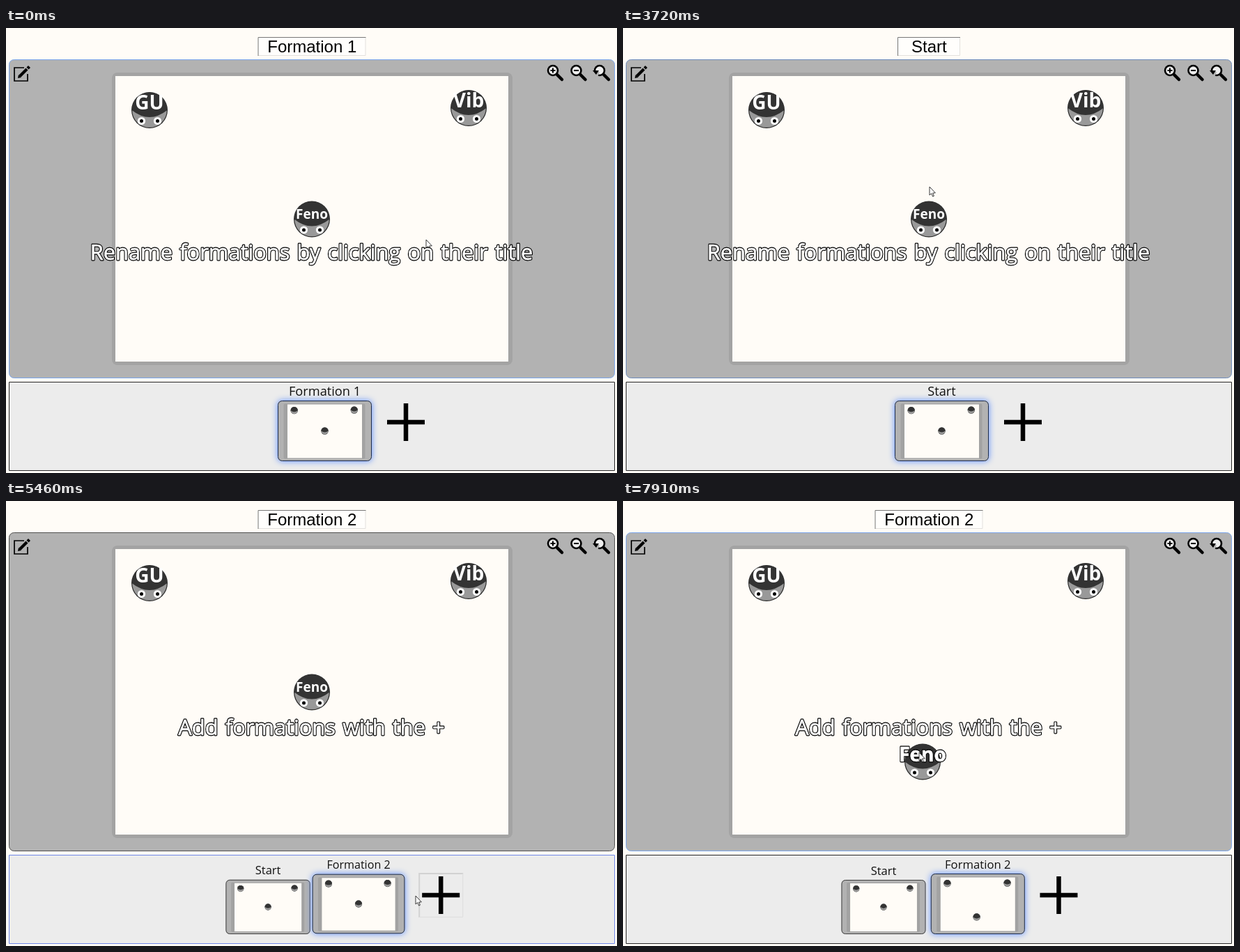
Animation of 877 by 639 pixels, one loop 8 s. Source, as an HTML page with a canvas:

```html
<!DOCTYPE html>
<html lang="en">
<head>
<meta charset="utf-8">
<title>Formations</title>
<style>
html, body { margin: 0; height: 100%; overflow: hidden; background: #fffcf7; }
canvas { display: block; }
</style>
</head>
<body>
<canvas id="stage" width="877" height="639"></canvas>
<script>
const ctx = document.getElementById('stage').getContext('2d');
const LOOP = 8000, PAPER = '#fffcf7', UI = '"Open Sans", "Noto Sans", sans-serif';
const FOCUS = 1230, SELECT = 1610, TYPE = 2500, KEY = 175, LAG = 150, BLUR = 3660;
const ADD = 5040, DRAG = 7030, DROP = 7600, RELEASE = 7910;

// Pointer stops: arrival time, travel time, x, y
const STOPS = [
  [600, 540, 507, 31], [2040, 260, 337, 26], [3720, 80, 440, 228], [4700, 450, 580, 515],
  [4900, 170, 588, 567], [5970, 500, 499, 11], [6190, 200, 491, 22], [6800, 180, 434, 261],
  [7460, 430, 425, 361]
];
const CORNERS = [{ name: 'GU', x: 206, y: 118 }, { name: 'Vib', x: 664, y: 115 }];

const clamp = u => Math.min(1, Math.max(0, u));
const ease = u => (u = clamp(u), u * u * (3 - 2 * u));
const mix = (a, b, u) => a + (b - a) * u;
const blend = (a, b, u) => `rgb(${a.map((v, i) => Math.round(mix(v, b[i], u)))})`;

function pointerAt(t) {
  let x = 603, y = 304;
  for (const [end, travel, nextX, nextY] of STOPS) {
    const u = ease((t - end + travel) / travel);
    x = mix(x, nextX, u);
    y = mix(y, nextY, u);
  }
  return [x, y];
}
// Share of the last 100 ms that the pointer spent between two heights
function hover(t, top, bottom) {
  let inside = 0;
  for (let back = 0; back < 100; back += 5) {
    const y = pointerAt(t - back)[1];
    if (y > top && y < bottom) inside++;
  }
  return inside / 20;
}
const typed = t => t < TYPE ? 'Formation 1' : 'Start'.slice(0, 1 + Math.floor((t - TYPE) / KEY));
function frontAvatar(t) {
  const [x, y] = pointerAt(Math.max(t, DRAG));
  return { name: 'Feno', x: x + 5, y: y + 13.5 };
}

function box(x, y, w, h, r, fill, stroke) {
  ctx.beginPath();
  ctx.roundRect(x, y, w, h, r);
  if (fill) { ctx.fillStyle = fill; ctx.fill(); }
  if (stroke) { ctx.lineWidth = 1; ctx.strokeStyle = stroke; ctx.stroke(); }
}
function disc(x, y, r, fill) {
  ctx.beginPath();
  ctx.arc(x, y, r, 0, 7);
  ctx.fillStyle = fill;
  ctx.fill();
}
function path(points, width, color = '#000') {
  ctx.beginPath();
  points.forEach(p => ctx.lineTo(...p));
  ctx.lineWidth = width;
  ctx.strokeStyle = color;
  ctx.stroke();
}
function polygon(points, fill) {
  ctx.beginPath();
  points.forEach(p => ctx.lineTo(...p));
  ctx.closePath();
  ctx.fillStyle = fill;
  ctx.fill();
}
function cross(x, y, arm, width) {
  path([[x - arm, y], [x + arm, y]], width);
  path([[x, y - arm], [x, y + arm]], width);
}
function text(str, x, y, font, color, outlined) {
  ctx.font = font;
  ctx.textAlign = 'center';
  if (outlined) {
    ctx.lineJoin = 'round';
    for (const [width, stroke] of [[2.8, '#000'], [.6, color]]) {
      ctx.lineWidth = width;
      ctx.strokeStyle = stroke;
      ctx.strokeText(str, x, y);
    }
    ctx.lineJoin = 'miter';
  }
  ctx.fillStyle = color;
  ctx.fillText(str, x, y);
}

function face(x, y, scale) {
  ctx.save();
  ctx.translate(x, y);
  ctx.scale(scale, scale);
  disc(0, 0, 26, '#2a2a2a');
  disc(0, 0, 24.8, '#999');
  ctx.beginPath();
  ctx.arc(0, 0, 25.4, Math.PI, 0);
  ctx.quadraticCurveTo(0, 20, -25.4, 0);
  ctx.fillStyle = '#333';
  ctx.fill();
  path([], 1.2);
  ctx.restore();
}
function avatar({ name, x, y }, hovered) {
  face(x, y, 1);
  for (const eye of [x - 11.5, x + 11.5]) {
    disc(eye, y + 15.5, 5.6, '#fff');
    disc(eye, y + 15.5, 2.5, '#000');
  }
  const font = size => `bold ${size}px ${UI}`;
  ctx.font = font(28);
  const fit = hovered ? 1 : Math.min(1, 46 / ctx.measureText(name).width);
  text(name, x, y - .8, font(28 * fit), '#fff', hovered);
}

function thumbnail(x, y, scale, avatars, selected) {
  ctx.save();
  ctx.translate(x, y);
  ctx.scale(scale, scale);
  if (selected) { ctx.shadowColor = '#5a8cff'; ctx.shadowBlur = 10; }
  box(-67.5, -43.5, 135, 87, 6, '#b2b2b2');
  ctx.shadowColor = 'transparent';
  box(-67, -43, 134, 86, 6, null, selected ? '#1d2c4c' : '#333');
  box(-59, -39, 117, 79, 2, '#a2a2a2');
  box(-53.5, -38, 107, 77, 0, PAPER);
  for (const a of avatars) face((a.x - 439) * .188, (a.y - 274) * .188, .2);
  ctx.restore();
}

function magnifier(x, kind) {
  const y = 61;
  ctx.lineCap = 'round';
  path([[x + 6, y + 6], [x + 13, y + 13]], 4.5);
  ctx.lineCap = 'butt';
  disc(x, y, 8.3, '#000');
  disc(x, y, 5.7, '#eee');
  if (kind === 'reset') {
    polygon([[x - 10, y], [x, y + 2], [x - 3, y + 10], [x - 10, y + 9]], '#b2b2b2');
    polygon([[x - 10, y], [x - 1, y], [x - 5, y + 6]], '#000');
  } else if (kind === 'in') {
    cross(x, y, 3.5, 2);
  } else {
    path([[x - 3.5, y], [x + 3.5, y]], 2);
  }
}
function icons(alpha) {
  ctx.globalAlpha = alpha;
  path([[26, 57], [12, 57], [12, 76], [31, 76], [31, 66]], 1.7);
  path([[20, 69], [30, 59]], 4.2);
  polygon([[17, 72], [18, 67], [22, 71]], '#000');
  path([[31, 58], [33.5, 55.5]], 4.2);
  ['in', 'out', 'reset'].forEach((kind, i) => magnifier(785 + 33.5 * i, kind));
  ctx.globalAlpha = 1;
}

function titleField(t) {
  const str = t < ADD ? typed(t) : 'Formation 2';
  const half = t >= TYPE + LAG && t < ADD ? 45 : 77.5;
  const left = 439 - half, right = 439 + half, focused = t >= FOCUS && t < BLUR;
  const font = '24px "Liberation Sans", Arial, sans-serif';
  box(left, 13, half * 2, 27, 0, '#fffefc');
  if (focused) {
    box(left + .5, 13.5, half * 2 - 1, 26, 0, null, '#6f98e6');
  } else {
    path([[left, 39.5], [right - .5, 39.5], [right - .5, 13]], 1, '#e2e0dd');
    path([[left + .5, 40], [left + .5, 13.5], [right, 13.5]], 1, '#777');
  }
  text(str, 439.3, 35, font, '#000');
  const end = 439 + ctx.measureText(str).width / 2;
  if (t >= SELECT && t < TYPE) {
    // The last word first, then the whole title once the pointer is past it
    const start = pointerAt(t)[0] > 478 ? 489 : 376;
    ctx.save();
    box(start, 15, end - start, 24, 0, '#0078d7');
    ctx.clip();
    text(str, 439.3, 35, font, '#fff');
    ctx.restore();
  } else if (focused) {
    path([[end - .5, 16], [end - .5, 38]], 1);
  }
}

function strip(t) {
  box(4.5, 508.5, 869, 127, 0, '#ececec', blend([40, 40, 40], [112, 136, 232], hover(t, 503, 639)));
  const added = t >= ADD, grow = 1 - (1 - clamp((t - ADD) / 500)) ** 2;
  const label = (str, x, top, size) => text(str, x, top - 7.5, `${size}px ${UI}`, '#111');
  const avatars = time => [...CORNERS, frontAvatar(time)];

  const scale = mix(1, .896, grow), height = 87 * scale, x = mix(457.5, 374, grow);
  thumbnail(x, 622 - height / 2, scale, avatars(0), !added);
  label(typed(t - LAG), x, 622 - height, added ? 16.5 : 18.2);
  if (added) {
    const size = mix(.34, 1, grow), newX = mix(378, 509.3, grow);
    thumbnail(newX, 578.5, size, avatars(t < DROP ? 0 : t), true);
    label('Formation 2', newX, 578.5 - 43.5 * size, 16.7 * grow ** 1.43);
  }

  const plus = mix(574, 625.5, grow), [px, py] = pointerAt(t);
  if (py > 534 && Math.abs(px - plus) < 40) {
    path([[plus - 31, 598], [plus - 31, 535], [plus + 32, 535]], 2, '#d2d2d2');
    path([[plus - 31, 597.5], [plus + 31.5, 597.5], [plus + 31.5, 535]], 1, '#dedede');
  }
  cross(plus, 566, 27, 6.5);
}

function pointer(t) {
  if (t >= DRAG && t < RELEASE) return;
  const [x, y] = pointerAt(t);
  ctx.save();
  ctx.translate(x, y);
  if (x > 362 && x < 516 && y > 13 && y < 40) {
    for (const end of [-6.5, 6.5]) path([[-2.5, end], [2.5, end]], 1, '#333');
    path([[0, -6.5], [0, 6.5]], 1, '#333');
  } else {
    const arrow = [[0, 0], [0, 12], [2.7, 9.6], [4.6, 14], [6.4, 13.2], [4.6, 9], [8.3, 8.8], [0, 0]];
    polygon(arrow, '#fff');
    path(arrow, .9, '#222');
  }
  ctx.restore();
}

function caption(t) {
  ctx.wordSpacing = '2.2px';
  const font = `30.8px ${UI}`;
  if (t < 4300) text('Rename formations by clicking on their title', 438.5, 333, font, '#fff', true);
  else text('Add formations with the +', 438.5, 336, font, '#fff', true);
  ctx.wordSpacing = '0px';
}

function draw(t) {
  ctx.fillStyle = PAPER;
  ctx.fillRect(0, 0, 877, 639);
  box(4.5, 45.5, 869, 457, 7, '#b2b2b2', blend([80, 80, 80], [122, 166, 236], hover(t, 45, 503)));
  box(152, 64, 575, 420, 8, '#a3a3a3');
  box(157, 69, 564, 410, 0, PAPER);
  icons(t >= DRAG && t < DROP ? .3 : 1);
  titleField(t);
  strip(t);
  CORNERS.forEach(a => avatar(a));
  const front = frontAvatar(t), [x, y] = pointerAt(t);
  avatar(front, Math.hypot(x - front.x, y - front.y) < 26);
  pointer(t);
  caption(t);
}

const origin = performance.now();
function tick() {
  draw((performance.now() - origin) % LOOP);
  requestAnimationFrame(tick);
}
tick();
</script>
</body>
</html>
```
